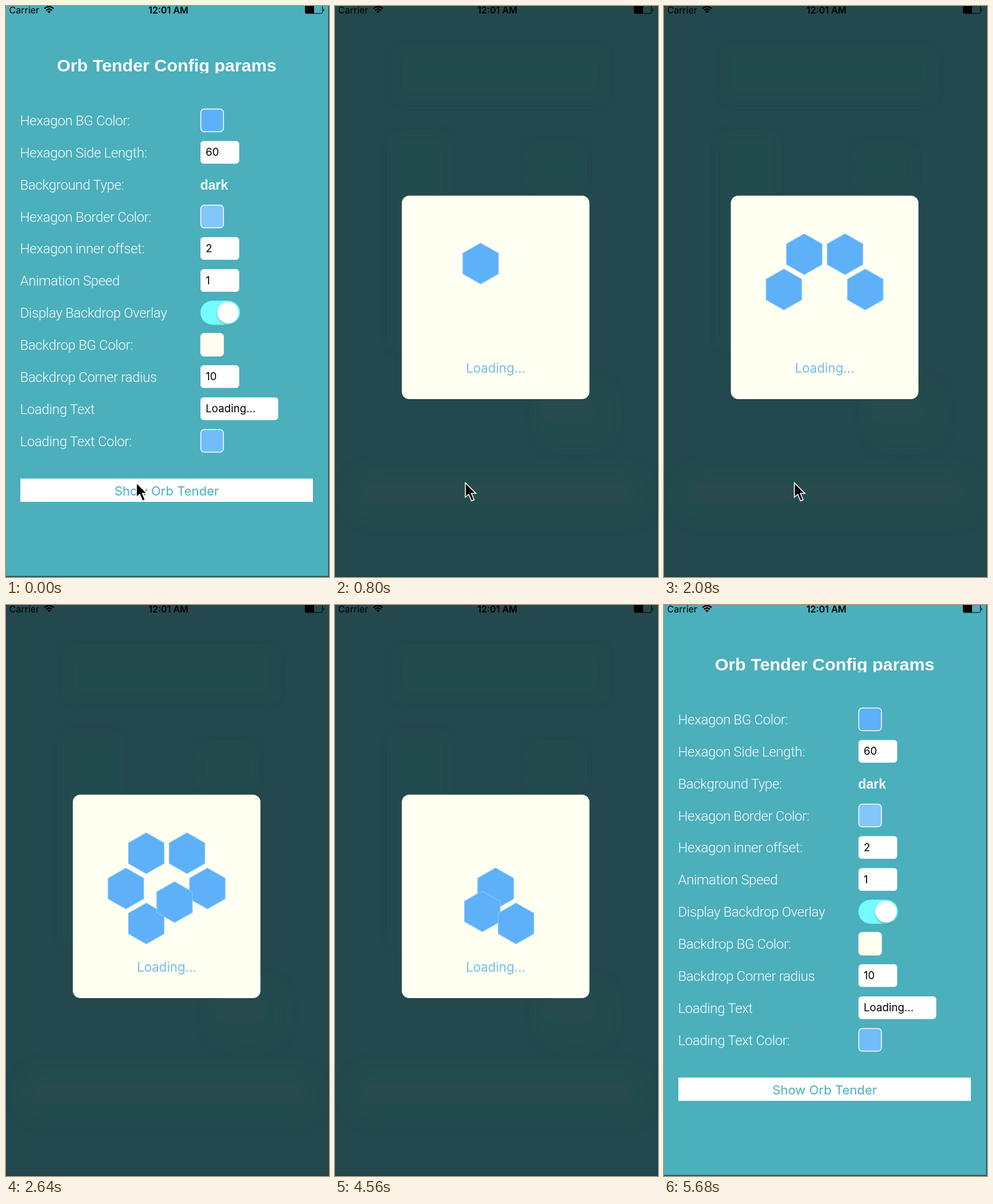
Recreate the animation shown at these times as an HTML page. Size 563 by 995 pixels, loop 5760 ms.

```html
<!DOCTYPE html>
<html lang="en">
<head>
<meta charset="utf-8">
<title>Hexagon loading dialog</title>
<style>
  html, body { margin: 0; height: 100%; overflow: hidden; background: #4bafbc; }
  svg { display: block; width: 563px; height: 995px; }
  text { font-family: Inter, sans-serif; }
  .title { font: bold 30.4px "Liberation Sans", Arial, sans-serif; fill: #fff; }
  .label { font: 300 24px Roboto, sans-serif; letter-spacing: -.37px; fill: #fff; }
  .value { font-size: 18.7px; }
  .strong { font: bold 23px "Liberation Sans", Arial, sans-serif; fill: #fff; }
  .status { font-size: 16px; }
  .button { font-size: 22px; fill: #4bafbc; }
  .message { font-size: 22.2px; fill: #70bdf5; }
  .hex { fill: #5eb0f9; stroke: #82c8f8; stroke-width: 1.2; }
</style>
</head>
<body>
<svg viewBox="0 0 563 995">
  <defs>
    <clipPath id="titleBox"><rect y="80" width="563" height="37"/></clipPath>
    <filter id="soft" x="-30%" y="-60%" width="160%" height="220%"><feGaussianBlur stdDeviation="9"/></filter>
    <filter id="shadow" x="-30%" y="-30%" width="160%" height="160%">
      <feDropShadow dx="0" dy="2" stdDeviation="1.5" flood-opacity=".3"/>
    </filter>
  </defs>
  <rect width="563" height="995" fill="#4bafbc"/>
  <text class="title" x="280" y="114" text-anchor="middle" clip-path="url(#titleBox)">Orb Tender Config params</text>
  <g id="form"></g>
  <rect x="25" y="823.5" width="510" height="40.5" fill="#fff"/>
  <text class="button" x="280" y="853" text-anchor="middle">Show Orb Tender</text>

  <g id="dim">
    <rect width="563" height="995" fill="#23484d"/>
    <g filter="url(#soft)" fill="#244c4d">
      <rect x="108" y="78" width="360" height="85"/>
      <rect x="100" y="225" width="95" height="370"/>
      <rect x="340" y="245" width="90" height="75"/>
      <rect x="350" y="650" width="140" height="120" rx="40"/>
      <rect x="18" y="800" width="534" height="105" rx="45"/>
      <rect x="45" y="827" width="475" height="37" rx="18" fill="#2b4b4e"/>
      <rect x="365" y="687" width="85" height="34" rx="12" fill="#294b4e"/>
    </g>
  </g>

  <text class="status" x="5.5" y="13">Carrier</text>
  <text class="status" x="283" y="13" text-anchor="middle" font-weight="600">12:01 AM</text>
  <g fill="none" stroke="#000" stroke-width="2.3">
    <path d="M67 4.5Q75 -2.5 83 4.5M70 7.6Q75 3 80 7.6"/>
    <path d="M72 9.5Q75 7 78 9.5L75 12.5Z" fill="#000" stroke="none"/>
    <rect x="521.5" y="-1" width="30" height="14" rx="2" stroke-width="1"/>
    <path d="M522 0H537V13H522ZM553 4q3 3 0 6Z" fill="#000" stroke="none"/>
  </g>

  <g id="dialog">
    <rect x="116.5" y="330.5" width="327" height="354.5" rx="13" fill="#fffff2"/>
    <g id="hexes"></g>
    <text class="message" x="280" y="639" text-anchor="middle">Loading...</text>
  </g>
  <path d="M562.5 0V994H0" fill="none" stroke="#1b3f45" stroke-width="1.5"/>
  <path id="cursor" d="M227.3 831v25l5.7-5 5 11.5 4.5-2-4.7-11.3h7.7Z" stroke="#fff" stroke-width="1.6"/>
</svg>
<script>
const LOOP = 5760, STEP = 80;
const SHOW = 400, HIDE = 5440, CURSOR_OUT = 2240;
const START = 544, MOVE = 386.3, GONE = 5293;
const $ = id => document.getElementById(id);
const clamp = v => Math.max(0, Math.min(1, v));
const ease = v => { v = clamp(v); return v * v * (3 - 2 * v); };

const swatch = (fill, border = '#fff') => y =>
  `<rect x="339.5" y="${y - 19.8}" width="39.5" height="39.5" rx="6" fill="${fill}" stroke="${border}" stroke-width="1.5"/>`;
const field = (text, width = 67.5) => y =>
  `<rect x="339" y="${y - 20}" width="${width}" height="39.5" rx="5.5" fill="#fff"/>
   <text class="value" x="348" y="${y + 6.3}">${text}</text>`;
const toggle = y =>
  `<rect x="339" y="${y - 21}" width="69" height="42" rx="21" fill="#73fdff"/>
   <circle cx="387" cy="${y}" r="18.8" fill="#fff" filter="url(#shadow)"/>`;
const word = text => y => `<text class="strong" x="338.5" y="${y + 9}">${text}</text>`;

const rows = [
  ['Hexagon BG Color:', swatch('#5eb0fa')],
  ['Hexagon Side Length:', field('60')],
  ['Background Type:', word('dark')],
  ['Hexagon Border Color:', swatch('#82c6fa')],
  ['Hexagon inner offset:', field('2')],
  ['Animation Speed', field('1')],
  ['Display Backdrop Overlay', toggle],
  ['Backdrop BG Color:', swatch('#fffef0', '#fffef0')],
  ['Backdrop Corner radius', field('10')],
  ['Loading Text', field('Loading...', 135.5)],
  ['Loading Text Color:', swatch('#70bdfa')]
];
$('form').innerHTML = rows.map(([label, control], i) => {
  const y = 199.3 + 55.85 * i;
  return `<text class="label" x="24.5" y="${y + 8.7}">${label}</text>${control(y)}`;
}).join('');

// Ring slots in row order, relative to the centre
const slots = [[-35.5, -61.5], [35.5, -61.5], [-71, 0], [71, 0], [-35.5, 61], [35.5, 61]];
$('hexes').innerHTML = slots.map(() =>
  '<path class="hex" d="M0-35.5 31-17.8V17.8L0 35.5-31 17.8V-17.8Z"/>').join('');
const hexes = [...$('hexes').children];

function draw(t) {
  const open = t >= SHOW && t < HIDE;
  $('dialog').style.display = open ? '' : 'none';
  $('dim').style.opacity = open ? clamp((t - 480) / 160) : 0;
  $('cursor').style.display = t < CURSOR_OUT ? '' : 'none';

  const collapse = START + 6 * MOVE, end = START + 12 * MOVE;
  const shrink = clamp((GONE - t) / (GONE - end));
  hexes.forEach((hex, i) => {
    const begin = START + i * MOVE;
    const out = ease((t - begin) / MOVE) - ease((t - collapse - i * MOVE) / MOVE);
    const [x, y] = slots[i];
    hex.style.display = t >= begin && shrink > 0 ? '' : 'none';
    hex.setAttribute('transform', `translate(${280 + x * out} ${494 + y * out}) scale(${shrink})`);
  });
}

function tick() {
  draw(Math.floor(performance.now() % LOOP / STEP) * STEP);
  requestAnimationFrame(tick);
}
tick();
</script>
</body>
</html>
```
